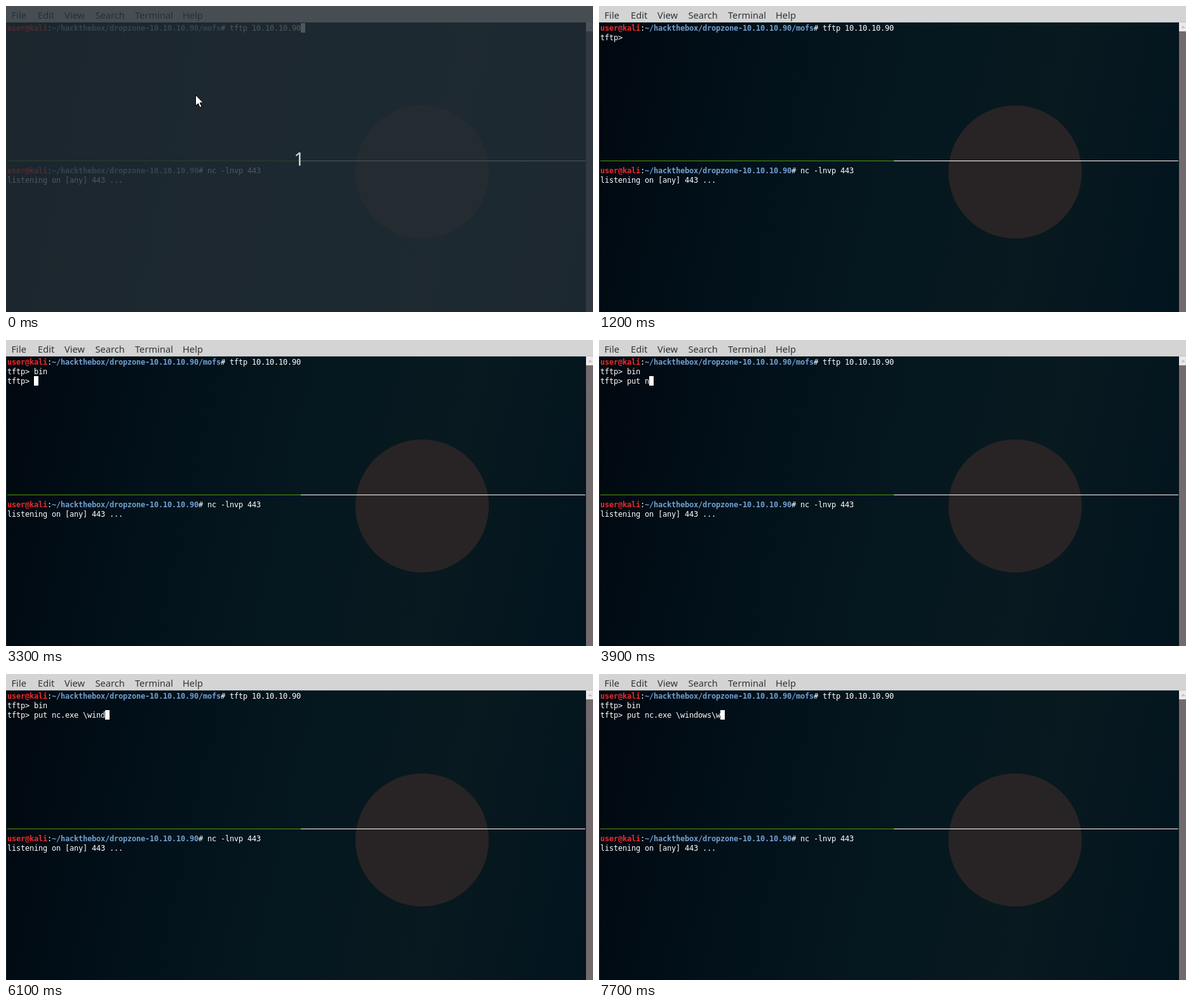
An HTML page with a canvas that plays this animation: 924x483 px, repeating every 8 s.

```html
<!DOCTYPE html>
<html lang="en">
<head>
<meta charset="utf-8">
<title>Terminal session</title>
<style>
  html, body { margin: 0; width: 100%; height: 100%; overflow: hidden; background: #02111a; }
  canvas { display: block; width: 924px; height: 483px; }
</style>
</head>
<body>
<canvas id="stage" width="924" height="483"></canvas>
<script>
const W = 924, H = 483, LOOP = 8000;
const CELL = 7, LINE = 15, LEFT = 2, TOP = 27, LOWER = 252;
const WHITE = '#ffffff', RED = '#ef2929', BLUE = '#729fcf';
const MONO = '12px "DejaVu Sans Mono", monospace';
const ctx = document.getElementById('stage').getContext('2d');

const COMMAND = 'tftp 10.10.10.90';
const PATH = '~/hackthebox/dropzone-10.10.10.90';
const PROMPT = 'tftp> ';
const MENU = [['File', 8.5], ['Edit', 50], ['View', 92], ['Search', 140.5], ['Terminal', 203], ['Help', 278]];

// Typing script: [time, row, typed text, caret shown]
const KEYS = [
  [0, 0, '', true],
  [600, 1, null, true],
  [700, 1, '', true], [1200, 1, '', false],
  [1500, 1, 'b', true], [1600, 1, 'bi', true], [1800, 1, 'bin', true],
  [2100, 2, '', true], [2600, 2, '', false], [3300, 2, '', true],
  [3400, 2, 'p', true], [3600, 2, 'pu', true], [3700, 2, 'put', true],
  [3800, 2, 'put ', true], [3900, 2, 'put n', true],
  [4500, 2, 'put ', true], [4700, 2, 'put n', true],
  [4900, 2, 'put nc', true], [5000, 2, 'put nc.', true], [5100, 2, 'put nc.e', true],
  [5300, 2, 'put nc.ex', true], [5600, 2, 'put nc.exe \\', true],
  [5900, 2, 'put nc.exe \\w', true], [6000, 2, 'put nc.exe \\win', true],
  [6100, 2, 'put nc.exe \\wind', true], [6300, 2, 'put nc.exe \\window', true],
  [6500, 2, 'put nc.exe \\windows', true], [7100, 2, 'put nc.exe \\windows', false],
  [7300, 2, 'put nc.exe \\windows\\', true], [7700, 2, 'put nc.exe \\windows\\w', true]
];

function rect(x, y, w, h, color) {
  ctx.fillStyle = color;
  ctx.fillRect(x, y, w, h);
}

// Writes on the character grid and returns the next column.
function write(text, col, top, color = WHITE, bold = false) {
  ctx.font = (bold ? 'bold ' : '') + MONO;
  ctx.fillStyle = color;
  for (const ch of text) ctx.fillText(ch, LEFT + CELL * col++, top + 12);
  return col;
}

function shellLine(top, path, command) {
  let col = write('user@kali', 0, top, RED, true);
  col = write(':', col, top);
  col = write(path, col, top, BLUE, true);
  return write('# ' + command, col, top);
}

function drawWindow() {
  const g = ctx.createLinearGradient(0, 130, W, 330);
  [[0, '#010810'], [0.25, '#02111a'], [0.5, '#05171f'], [0.75, '#08191f'], [1, '#02141e']]
    .forEach(([at, color]) => g.addColorStop(at, color));
  rect(0, 0, W, H, g);

  ctx.fillStyle = '#282425';
  ctx.beginPath();
  ctx.arc(655, 262, 105, 0, Math.PI * 2);
  ctx.fill();

  rect(0, 0, W, 26, '#d4d4d4');
  rect(0, 25, W, 1, '#c4c4c4');
  rect(0, 26, 1, H - 26, '#1b2a33');
  ctx.font = '14.67px "Noto Sans", sans-serif';
  ctx.fillStyle = '#2e3436';
  for (const [label, x] of MENU) ctx.fillText(label, x, 20);

  rect(913, 26, 11, H - 26, '#726a6c');
  rect(913, 26, 11, 14, '#eee8ea');
  ctx.fillStyle = '#c9c3c5';
  ctx.beginPath();
  ctx.moveTo(916, 35);
  ctx.lineTo(919.5, 31);
  ctx.lineTo(923, 35);
  ctx.fill();

  rect(2, 244, 462, 1, '#4e9a06');
  rect(464, 244, 448, 1, WHITE);
}

function drawText(t) {
  const [, row, typed, caret] = KEYS.findLast(key => key[0] <= t);
  let col = shellLine(TOP, PATH + '/mofs', COMMAND);
  if (row === 2) write(PROMPT + 'bin', 0, TOP + LINE);
  const top = TOP + row * LINE;
  if (row > 0) col = typed === null ? 0 : write(PROMPT + typed, 0, top);
  if (caret) rect(LEFT + col * CELL, top, CELL, LINE, WHITE);

  shellLine(LOWER, PATH, 'nc -lnvp 443');
  write('listening on [any] 443 ...', 0, LOWER + LINE);
}

function drawBeam() {
  const beam = new Path2D('M295.5 134.5h2l1 1l1-1h2M298.5 135.5v13M295.5 149.5h2l1-1l1 1h2');
  ctx.lineCap = 'square';
  ctx.strokeStyle = WHITE;
  ctx.lineWidth = 3;
  ctx.stroke(beam);
  ctx.strokeStyle = '#000';
  ctx.lineWidth = 1;
  ctx.stroke(beam);
}

function drawCountdown() {
  rect(0, 0, W, H, 'rgba(36,45,53,0.8)');
  const arrow = new Path2D('M298.5 140.5v17l4-3.5l2.7 6l2.8-1.2l-2.7-6h5.2z');
  ctx.fillStyle = WHITE;
  ctx.fill(arrow);
  ctx.strokeStyle = '#000';
  ctx.lineWidth = 1;
  ctx.stroke(arrow);

  ctx.font = '29px "Noto Sans", sans-serif';
  ctx.fillStyle = '#d3d5d7';
  ctx.textAlign = 'center';
  ctx.fillText('1', 461.5, 252);
  ctx.textAlign = 'left';
}

function frame() {
  const t = performance.now() % LOOP;
  drawWindow();
  drawText(t);
  if (t < 100) drawCountdown();
  else if (t < 500) drawBeam();
  requestAnimationFrame(frame);
}
frame();
</script>
</body>
</html>
```
